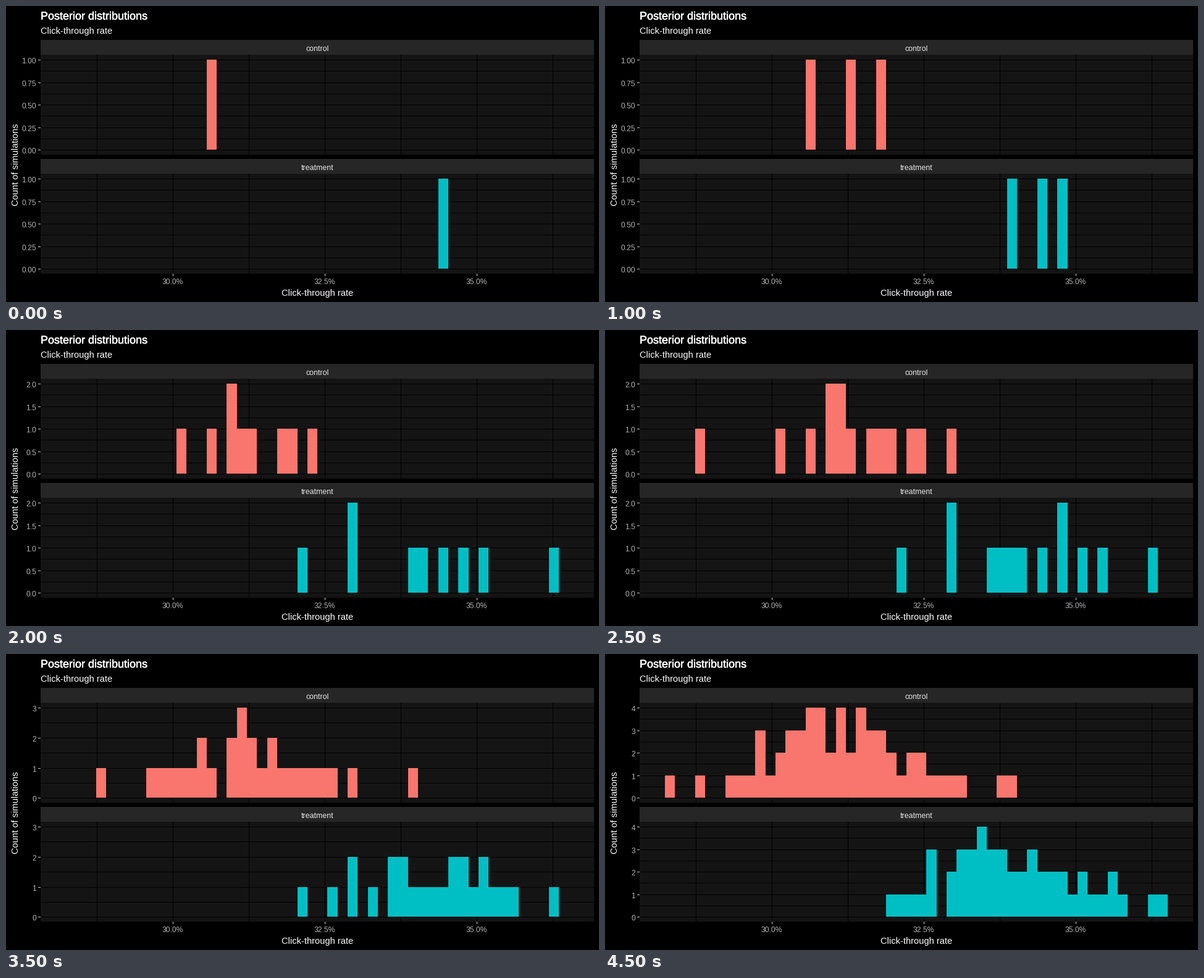
A matplotlib script that plays this animation: 960 px wide and 480 px high, repeating every 5 s.

```python
import matplotlib.pyplot as plt
from matplotlib.animation import FuncAnimation
from matplotlib.patches import Rectangle
from matplotlib.patheffects import withStroke

W, H, DPI = 960, 480, 100
LEFT, RIGHT = 56, 952
PANEL_H, STRIP_H = 162, 24
BIN_X0, BIN_W = 96.74, 16.295
PLOT_H = 146.5

# Histogram bins hit by the simulations that arrive at each step
CONTROL = [
    [14], [21], [18], [11, 16], [16, 17, 22, 24],
    [3, 17, 20, 25, 28],
    [8, 9, 12, 18, 20, 23, 34],
    [10, 13, 13, 17, 19, 26],
    [0, 14, 14, 14, 15, 19, 19, 19, 22, 24, 25, 27, 29, 33],
    [6, 7, 9, 9, 11, 12, 12, 13, 15, 15, 15, 17, 20, 21, 21],
]
TREATMENT = [
    [37], [34], [39], [28, 48], [23, 28, 35, 41],
    [32, 33, 39, 43],
    [30, 32, 38, 40, 42],
    [26, 33, 36, 38, 41, 44],
    [22, 29, 29, 29, 30, 30, 31, 34, 44, 45, 49],
    [24, 25, 26, 26, 31, 31, 31, 32, 33, 35, 36, 36, 37],
]
# name, strip top, colour, draws
FACETS = [
    ("control", 55, "#F8766D", CONTROL),
    ("treatment", 248, "#00BFC4", TREATMENT),
]
# highest count -> major step, label format
SCALES = {1: (0.25, "%.2f"), 2: (0.5, "%.1f"), 3: (1, "%d"), 4: (1, "%d")}

plt.rcParams["font.family"] = "Liberation Sans"
fig = plt.figure(figsize=(W / DPI, H / DPI), dpi=DPI, facecolor="black")
ax = fig.add_axes([0, 0, 1, 1])
ax.set_xlim(0, W)
ax.set_ylim(H, 0)
ax.axis("off")


def box(x0, y0, x1, y1, color, z=1):
    return ax.add_patch(Rectangle((x0, y0), x1 - x0, y1 - y0, facecolor=color,
                                  linewidth=0, antialiased=False, zorder=z))


def label(x, y, text, px, color="white", ha="center", **kw):
    return ax.text(x, y, text, fontsize=px * 72 / DPI, color=color, ha=ha,
                   va="baseline", **kw)


def edge(i):
    return round(BIN_X0 + BIN_W * i)


def level(top, share):
    return round(top + 178.4 - PLOT_H * share)


def draw_static():
    label(LEFT, 22, "Posterior distributions", 18, ha="left",
          path_effects=[withStroke(linewidth=0.4, foreground="white")])
    label(LEFT, 45, "Click-through rate", 14.6, ha="left")
    label(504, 470, "Click-through rate", 14.6)
    ax.text(20, 257.5, "Count of simulations", fontsize=14.67 * 72 / DPI,
            color="white", rotation=90, ha="right", va="center").set_visible(False)
    ax.text(20, 257.5, "Count of simulations", fontsize=14.67 * 72 / DPI,
            color="white", rotation=90, rotation_mode="anchor",
            ha="center", va="baseline")
    for name, top, _, _ in FACETS:
        panel = top + STRIP_H
        box(LEFT, top, RIGHT, panel, "#262626")
        box(LEFT, panel, RIGHT, panel + PANEL_H, "#141414")
        label(504, top + 18, name, 12.4, "#E5E5E5")
        for x in range(147, RIGHT, 123):
            box(x, panel, x + 1, panel + PANEL_H, "black", 2)
    for k, text in enumerate(("30.0%", "32.5%", "35.0%")):
        x = 270 + 246 * k
        box(x, 434, x + 1, 438, "#CCCCCC")
        label(x, 451, text, 12, "#B3B3B3")


def counts(draws, step):
    seen = [b for batch in draws[:step + 1] for b in batch]
    return {b: seen.count(b) for b in set(seen)}


moving = []


def update(step):
    while moving:
        moving.pop().remove()
    bars = [counts(draws, step) for *_, draws in FACETS]
    peak = max(max(c.values()) for c in bars)
    major, fmt = SCALES[peak]
    for (_, top, color, _), heights in zip(FACETS, bars):
        for k in range(round(2 * peak / major) + 1):
            value = k * major / 2
            y = level(top, value / peak)
            moving.append(box(LEFT, y, RIGHT, y + 1, "black", 2))
            if k % 2 == 0:
                moving.append(box(52, y, LEFT, y + 1, "#CCCCCC"))
                moving.append(label(49, y + 6, fmt % value, 12, "#B3B3B3", "right"))
        for b, n in heights.items():
            moving.append(box(edge(b), level(top, n / peak), edge(b + 1),
                              level(top, 0), color, 3))
    return moving


draw_static()
anim = FuncAnimation(fig, update, frames=10, interval=500, repeat=True,
                     repeat_delay=0, blit=False)
plt.show()
```
